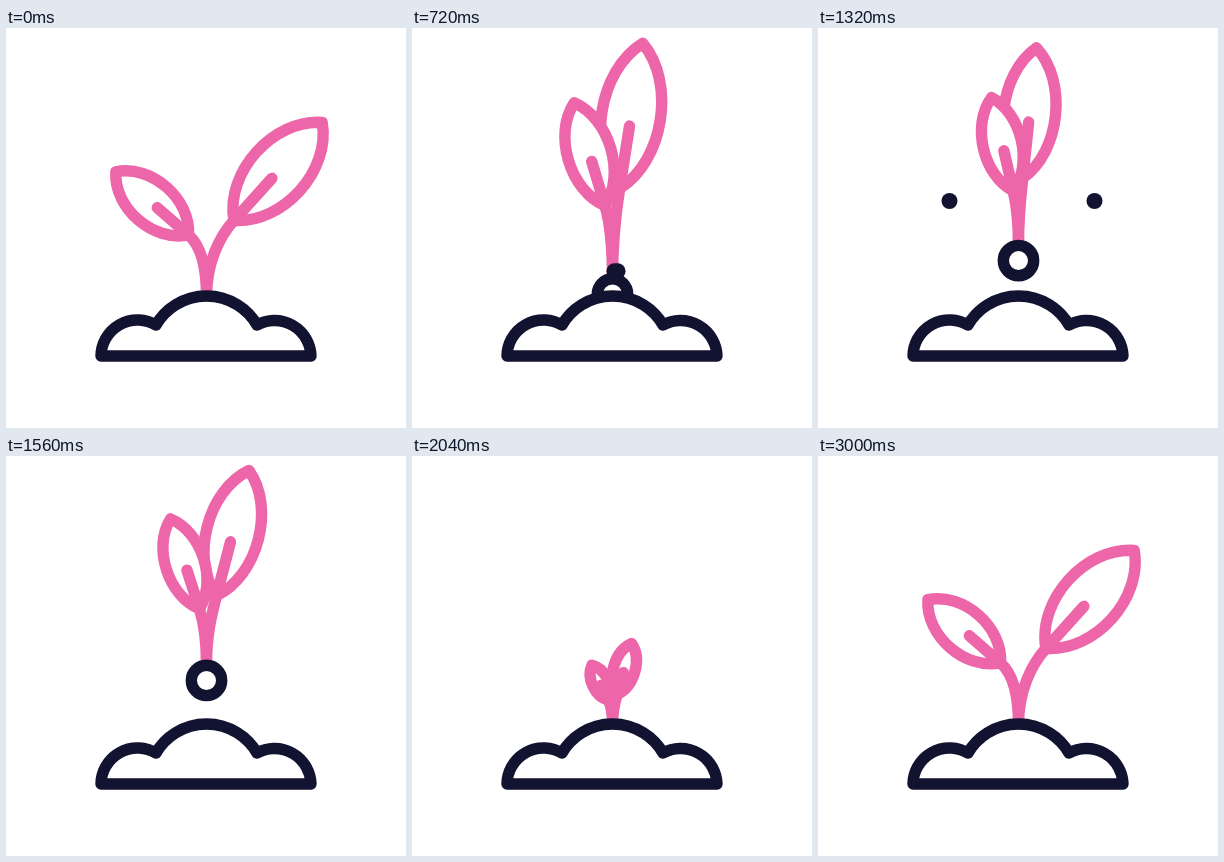
An HTML page for the animation above (3630 ms loop, 400 by 400 pixels).

```html
<!DOCTYPE html>
<html lang="en">
<head>
<meta charset="utf-8">
<title>Sprout</title>
<style>
  html, body { margin: 0; width: 100%; height: 100%; overflow: hidden; background: #fff; }
  svg { display: block; width: 100vw; height: 100vh; }
  path, circle { fill: none; stroke-width: 11.4; stroke-linecap: round; stroke-linejoin: round; }
  .plant { stroke: #ee66aa; }
  .soil { stroke: #121331; }
  .solid { fill: #fff; }
  .dot { fill: #121331; }
</style>
</head>
<body>
<svg viewBox="0 0 400 400">
  <path id="rightLeaf" class="plant solid"/>
  <path id="rightStem" class="plant"/>
  <path id="leftLeaf" class="plant solid"/>
  <path id="leftStem" class="plant"/>
  <circle id="seed" class="soil solid" cx="200.5" r="15.2"/>
  <circle id="leftDot" class="dot" r="8"/>
  <circle id="rightDot" class="dot" r="8"/>
  <path id="mound" class="soil solid"
    d="M95 328A36.5 36.5 0 0 1 150 297A58.5 58.5 0 0 1 251 297A36.5 36.5 0 0 1 305 328Z"/>
</svg>
<script>
const LOOP = 3630, STEP = 30, END = 3000, CENTER = 200.5, LAG = 60;
const $ = id => document.getElementById(id);

const easeIn = power => u => u ** power;
const easeOut = power => u => 1 - (1 - u) ** power;
const smooth = u => u * u * (3 - 2 * u);
const progress = (t, from, to) => Math.min(1, Math.max(0, (t - from) / (to - from)));

// Each phase eases towards its pose: lean in degrees, leaf length, stem height.
const rest = { lean: 42, leaf: 132, stem: 76 };
const phases = [
  { until: 720, lean: 9, leaf: 147, stem: 90, ease: smooth },           // stretch
  { until: 1320, lean: 6, leaf: 131, stem: 67, ease: easeOut(1.6) },    // float
  { until: 1770, lean: 36, leaf: 125, stem: 75, ease: easeIn(2) },      // open
  { until: 2040, lean: 16, leaf: 53, stem: 30, ease: easeOut(1.5) },    // shrink
  { until: END, ...rest, ease: easeOut(2.3) }                           // grow
];

function plantAt(t) {
  let pose = rest, from = 0;
  for (const phase of phases) {
    if (t <= phase.until) {
      const k = phase.ease(progress(t, from, phase.until));
      const mix = key => pose[key] + (phase[key] - pose[key]) * k;
      return { lean: mix("lean"), leaf: mix("leaf"), stem: mix("stem") };
    }
    pose = phase;
    from = phase.until;
  }
}

function seedAt(t) {
  const pop = easeIn(6)(progress(t, 0, 720));
  const rise = easeOut(1.6)(progress(t, 720, 1770));
  const fall = easeIn(2)(progress(t, 1770, 1950));
  return 284 - 18 * pop - 45 * rise + 63 * fall;
}

function drawLeaf(name, side, foot, spread, stem, lean, length) {
  const angle = lean * Math.PI / 180;
  const dx = side * Math.sin(angle), dy = -Math.cos(angle);
  const x = CENTER + dx * spread, y = foot - stem;
  const bulge = length * (.195 + .0006 * lean) / .75;
  const at = (along, across) =>
    `${x + dx * along - dy * across} ${y + dy * along + dx * across} `;
  const edge = (from, to, across) =>
    `C${at(length * from, across)}${at(length * to, across)}`;

  $(name + "Leaf").setAttribute("d",
    `M${at(0, 0)}${edge(.23, .77, bulge)}${at(length, 0)}${edge(.77, .23, -bulge)}${at(0, 0)}Z`);
  $(name + "Stem").setAttribute("d",
    `M${CENTER} ${foot}C${CENTER} ${foot - stem * .45} ${at(-stem * .28, 0)}${at(0, 0)}L${at(length * .43, 0)}`);
}

// The dots burst out from behind the mound, hang, and drop back behind it.
function drawDots(t) {
  const up = progress(t, 660, 1080), down = progress(t, 1080, 1560);
  const offset = 66 * up ** 3 * (10 - 15 * up + 6 * up * up) + 26 * easeIn(2)(down);
  const y = 278 - 131 * easeOut(2)(up) + 169 * easeIn(2.7)(down);
  for (const [name, side] of [["left", -1], ["right", 1]]) {
    $(name + "Dot").setAttribute("cx", 204 + side * offset);
    $(name + "Dot").setAttribute("cy", y);
  }
}

function draw(t) {
  const { lean, leaf, stem } = plantAt(t);
  const leftLean = plantAt(Math.max(0, t - LAG)).lean + 7;
  const seedY = seedAt(t), foot = seedY - 15.5;
  drawLeaf("right", 1, foot, leaf * .31, stem, lean, leaf);
  drawLeaf("left", -1, foot, leaf * .18, stem * .81, leftLean, leaf * .73);
  $("seed").setAttribute("cy", seedY);
  drawDots(t);
  const squash = 1 - .04 * Math.sin(Math.PI * progress(t, 0, 540)) ** 2;
  $("mound").setAttribute("transform", `translate(0 328) scale(1 ${squash}) translate(0 -328)`);
}

const start = performance.now();
function tick() {
  const t = (performance.now() - start) % LOOP;
  draw(Math.min(END, Math.floor(t / STEP) * STEP));
  requestAnimationFrame(tick);
}
tick();
</script>
</body>
</html>
```
